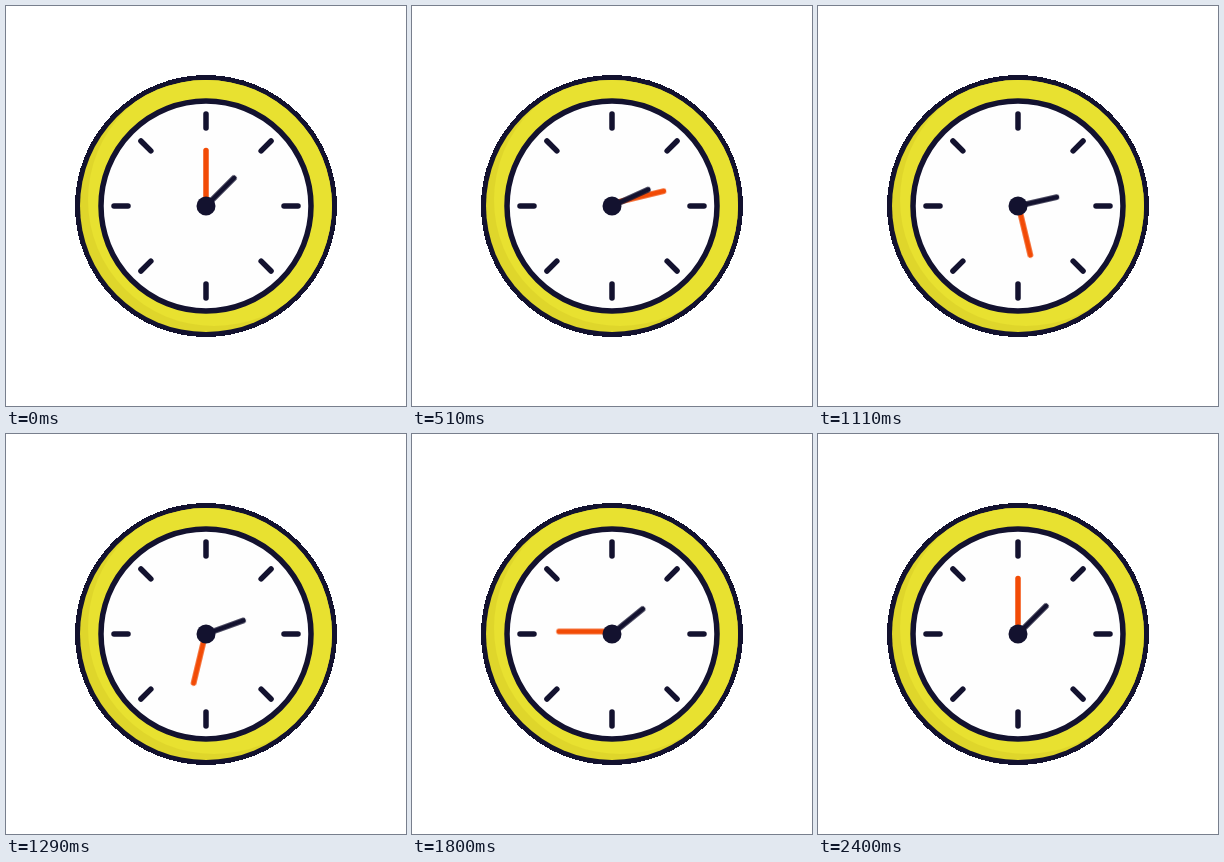
An HTML page that plays this animation: 400 px wide and 400 px high, repeating every 2490 ms.

```html
<!DOCTYPE html>
<html lang="en">
<head>
<meta charset="utf-8">
<title>Clock</title>
<style>
  html, body { margin: 0; width: 100%; height: 100%; overflow: hidden; background: #fff; }
  svg { display: block; width: 100%; height: 100%; }
  .ink { fill: #13122f; }
  .line { fill: none; stroke: #13122f; stroke-width: 5.5; stroke-linecap: round; }
  .minute, .hour { animation: 2490ms infinite; }
  .minute { stroke: #f24b06; transform-origin: 200px 197.5px; animation-name: minute; }
  .hour { transform-origin: 200px 200px; animation-name: hour; }

  /* Both hands finish at 2400 ms, then rest until the loop ends. */
  @keyframes minute {
    0% { transform: rotate(0deg); animation-timing-function: steps(80, end); }
    96.386%, 100% { transform: rotate(360deg); }
  }
  @keyframes hour {
    0% { transform: rotate(45deg); animation-timing-function: cubic-bezier(.37, 0, .63, 1); }
    37.349% { transform: rotate(80.5deg); animation-timing-function: cubic-bezier(.3, .1, .36, 1); }
    96.386%, 100% { transform: rotate(45deg); }
  }
</style>
</head>
<body>
<svg viewBox="0 0 400 400">
  <defs>
    <clipPath id="rim"><circle cx="200" cy="200" r="126"/></clipPath>
    <path id="tick" class="line" d="M200 108V122"/>
    <g id="pair">
      <use href="#tick"/>
      <use href="#tick" transform="rotate(180 200 200)"/>
    </g>
  </defs>

  <circle class="ink" cx="200" cy="200" r="131" shape-rendering="crispEdges"/>
  <circle cx="200" cy="200" r="126" fill="#dfd62b"/>
  <circle cx="208" cy="194" r="126" fill="#e8e130" clip-path="url(#rim)"/>
  <circle cx="200" cy="200" r="105" fill="#fefefe" stroke="#13122f" stroke-width="5.5"/>

  <use href="#pair"/>
  <use href="#pair" transform="rotate(45 200 200)"/>
  <use href="#pair" transform="rotate(90 200 200)"/>
  <use href="#pair" transform="rotate(135 200 200)"/>

  <path class="line minute" d="M200 197.5V144.5"/>
  <path class="line hour" d="M200 200V160.5"/>
  <circle class="ink" cx="200" cy="200" r="9.5"/>
</svg>
</body>
</html>
```
